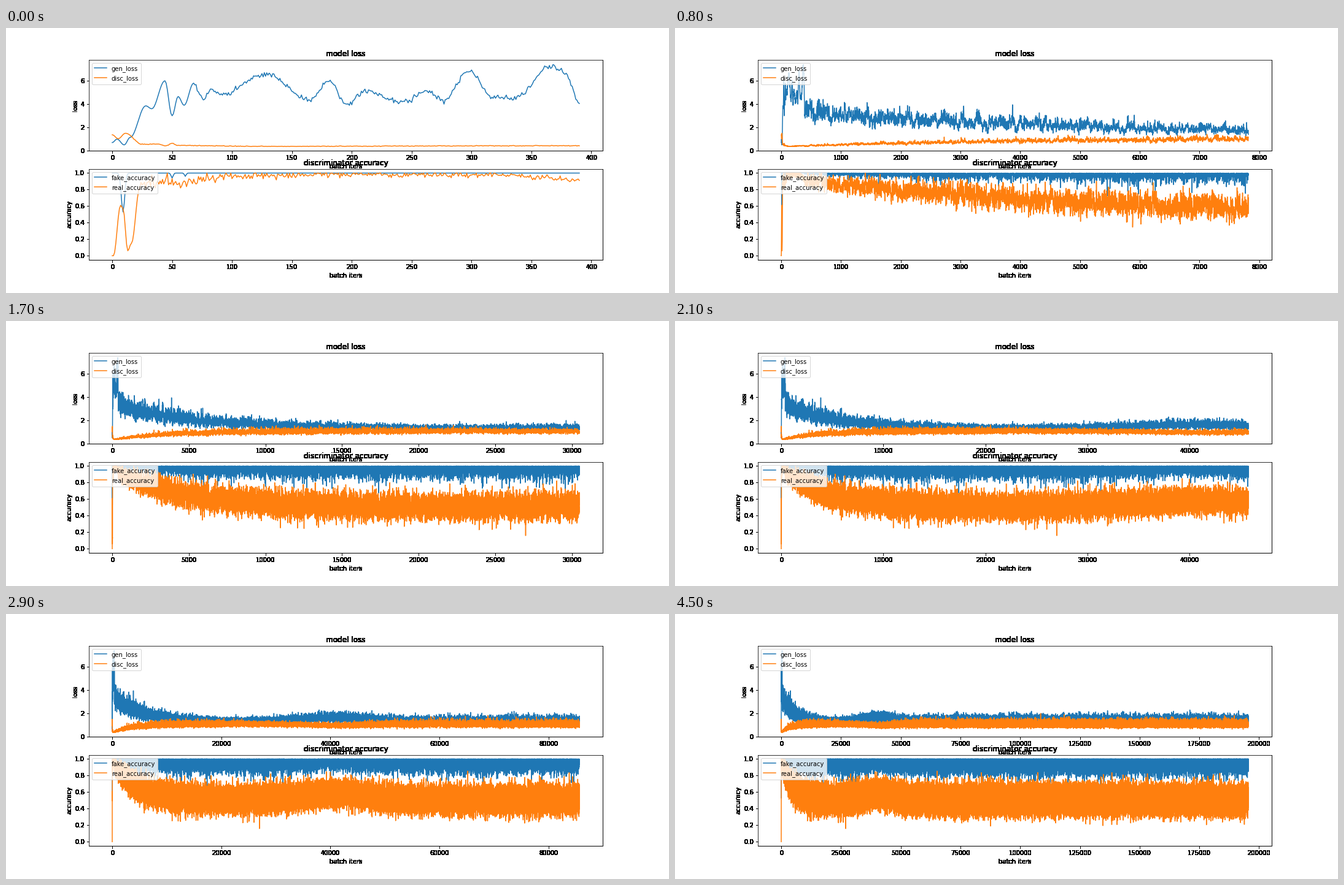
A matplotlib script that plays this animation: 1080x432 px, repeating every 4600 ms.

```python
import math
import numpy as np
import matplotlib.pyplot as plt
from matplotlib.animation import FuncAnimation

plt.rcParams.update({"figure.subplot.bottom": 0.125, "font.size": 10,
                     "font.family": "DejaVu Sans"})

EPOCH = 391
EPOCHS = 500
FRAMES = 46
TOTAL = EPOCH * EPOCHS
rng = np.random.default_rng(7)


# ---- curve helpers -------------------------------------------------------
def smooth_noise(n, width):
    half = math.ceil(3 * width)
    kernel = np.exp(-0.5 * (np.arange(-half, half + 1) / width) ** 2)
    kernel /= np.sqrt((kernel ** 2).sum())
    return np.convolve(rng.standard_normal(n + 2 * half), kernel, "valid")


def noise(n, fast, slow, share):
    return (math.sqrt(1 - share) * smooth_noise(n, fast)
            + math.sqrt(share) * smooth_noise(n, slow))


def hump(t, center, width):
    return np.exp(-((t - center) / width) ** 2)


def swing(t, turns):
    """Cosine easing from one turning point to the next."""
    x, y = np.array(turns).T
    i = np.clip(np.searchsorted(x, t, "right") - 1, 0, len(x) - 2)
    u = (t - x[i]) / (x[i + 1] - x[i])
    return y[i] + (y[i + 1] - y[i]) * (1 - np.cos(np.pi * u)) / 2


# ---- first epoch: turning points plus jitter -----------------------------
def first_epoch():
    t = np.arange(EPOCH)
    jitter = lambda: rng.standard_normal(EPOCH)
    gen = swing(t, [(0, .7), (4, 1), (10, .5), (15, 1.15), (28, 3.85),
                    (33, 3.6), (44, 6), (50, 3), (55, 4.65), (60, 3.9),
                    (68, 5.8), (76, 4.4), (83, 5.3), (90, 4.8), (128, 6.6),
                    (165, 4.4), (181, 6), (196, 3.9), (212, 5.2), (240, 4.2),
                    (264, 5.1), (276, 4.3), (298, 6.8), (318, 4.6),
                    (336, 4.5), (367, 7.3), (378, 6.7), (390, 4.1)])
    gen += .12 * jitter() * (t > 68)
    disc = swing(t, [(0, 1.37), (5, 1.03), (11, 1.5), (25, .55), (38, .58),
                     (45, .43), (50, .65), (54, .46), (125, .38), (390, .43)])
    disc += .015 * jitter() * (t > 15)
    fake = 1 - .47 * hump(t, 9, 2) - .06 * hump(t, 50, 1.2)
    fake -= .04 * hump(t, 61, 1)
    real = swing(t, [(0, 0), (1, 0), (7, .61), (9, .57), (13, .06), (16, .15),
                     (23, .82), (30, .9), (60, .9), (105, .96), (200, .985),
                     (320, .98), (390, .92)])
    real += jitter() * (.016 + .05 * np.exp(-t / 70)) * (t > 22)
    return np.minimum(gen, 7.45), disc, fake, real


# ---- remaining epochs: decaying trend, later swell, noise ----------------
def later_epochs():
    t = np.arange(EPOCH, TOTAL)
    age = t - EPOCH
    swell = hump(t, 41000, 8000)
    loss_noise = lambda: noise(len(t), 1.2, 9, .35)
    acc_noise = lambda: noise(len(t), .7, 6, .2)

    gen = 1.36 + 1.85 * np.exp(-age / 5000) + .28 * swell
    spread = .13 - .045 * hump(t, 21000, 9000) - .025 * hump(t, 45000, 20000)
    gen *= np.exp(spread * loss_noise())

    disc = 1.08 - .67 * np.exp(-age / 3600) - .11 * swell
    spread = .13 - .06 * np.exp(-t / 1500) - .04 * hump(t, 33000, 15000)
    disc *= np.exp(spread * loss_noise())

    depth = .038 * (1 - np.exp(-t / 2500)) - .01 * swell
    fake = 1 - depth * np.abs(acc_noise()) ** 1.5

    real = .51 + .41 * np.exp(-age / 4300) + .075 * swell
    spread = .077 - .043 * np.exp(-t / 2200) - .006 * swell
    real += spread * acc_noise()
    return gen, disc, fake, real


limits = ((.5, 8), (.36, 2), (.5, 1), (0, 1))
series = [np.r_[a, b].clip(*lim)
          for a, b, lim in zip(first_epoch(), later_epochs(), limits)]

# ---- figure --------------------------------------------------------------
fig, (top, bottom) = plt.subplots(2, 1, figsize=(15, 6), dpi=72,
                                  facecolor="white")


def harden(image, dpi):
    """Make every touched pixel fully opaque."""
    image = image.copy()
    image[..., 3] = image[..., 3] > 0
    return image, 0, 0


def dress(ax, title, ylabel, names, ylim):
    lines = [ax.plot([], [], label=name)[0] for name in names]
    ax.set_title(title)
    ax.set_ylabel(ylabel)
    ax.set_xlabel("batch iters")
    ax.set_ylim(*ylim)
    ax.legend(loc="upper left", framealpha=0.8)
    for part in (ax.title, ax.xaxis, ax.yaxis,
                 ax.spines["right"], ax.spines["bottom"]):
        part.set_agg_filter(harden)
    return lines


lines = (dress(top, "model loss", "loss", ("gen_loss", "disc_loss"),
               (0, 7.8))
         + dress(bottom, "discriminator accuracy", "accuracy",
                 ("fake_accuracy", "real_accuracy"), (-.05, 1.05)))


def thin(y):
    """Keep the low and high of each small run of samples."""
    step = len(y) // 8000
    if step < 3:
        return np.arange(len(y)), y
    cut = len(y) // step * step
    runs = y[:cut].reshape(-1, step)
    pairs = np.column_stack([runs.min(1), runs.max(1)]).ravel()
    x = np.arange(len(pairs)) * step / 2
    return np.r_[x, len(y) - 1], np.r_[pairs, y[-1]]


def epochs_done(i):
    if i == 0:
        return 1
    return min(EPOCHS, math.ceil(i * (i + 1) / 4 + 1.5))


def update(i):
    n = EPOCH * epochs_done(i)
    for line, y in zip(lines, series):
        line.set_data(*thin(y[:n]))
    for ax in (top, bottom):
        ax.set_xlim(-.05 * (n - 1), 1.05 * (n - 1))
    return lines


anim = FuncAnimation(fig, update, frames=FRAMES, interval=100,
                     init_func=lambda: update(0), repeat=True,
                     repeat_delay=0, blit=False)
plt.show()
```
